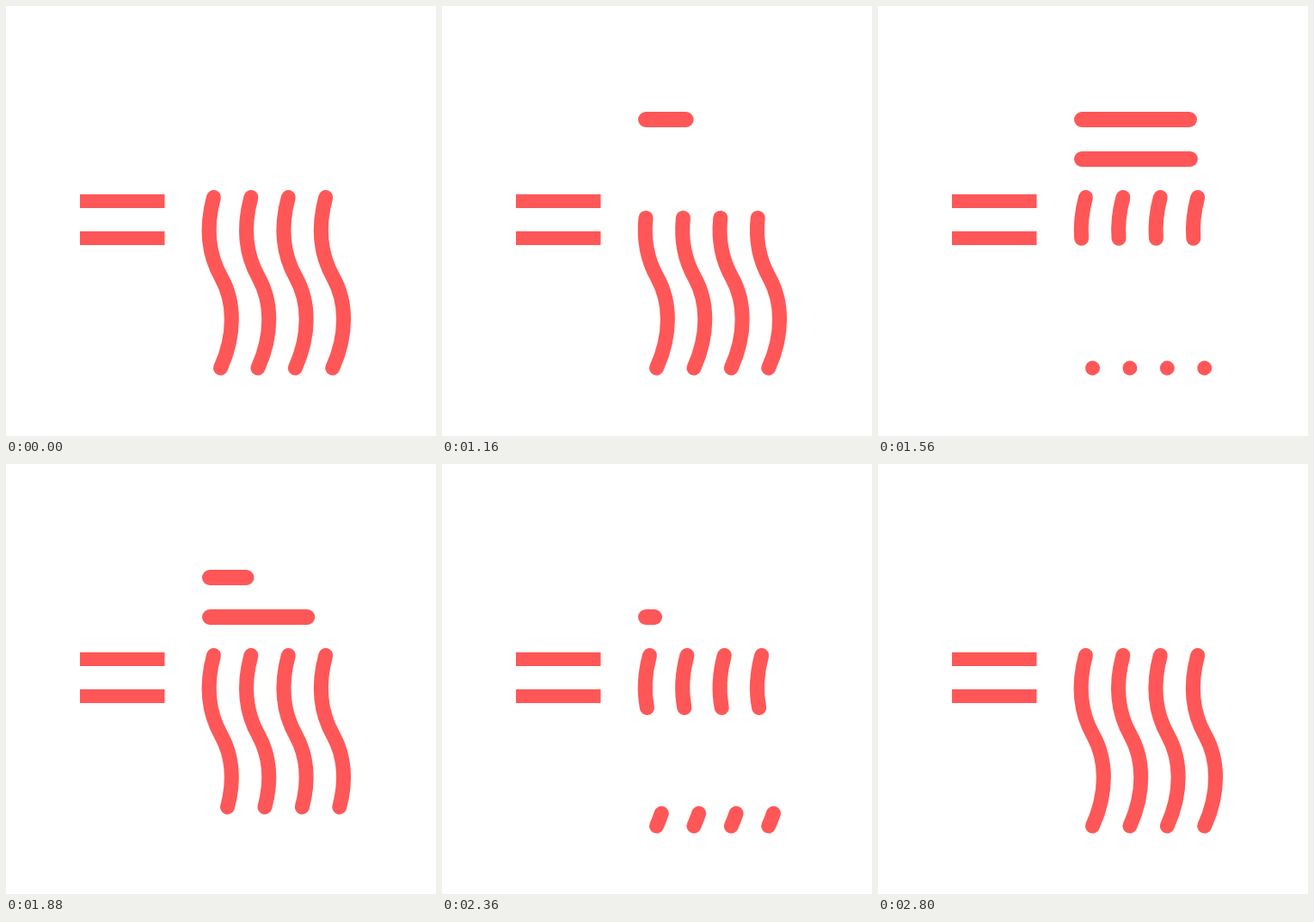
Write an HTML page with a canvas that moves like this. It is 500 px wide and 500 px high and loops after 3 s.

```html
<!DOCTYPE html>
<html lang="en">
<head>
<meta charset="utf-8">
<title>Steam</title>
<style>
html, body { margin: 0; width: 100%; height: 100%; overflow: hidden; background: #fff; }
canvas { display: block; width: 500px; height: 500px; }
</style>
</head>
<body>
<canvas id="stage" width="500" height="500"></canvas>
<script>
const ctx = document.getElementById('stage').getContext('2d');
const LOOP = 3000, STEP = 20, RED = '#ff5757';
const WAVE_COUNT = 4, WAVE_GAP = 43.4, BAR_LEN = 130;

const waveShape = 'M241.5 222.5C233 254 234 287 250.5 316C266 344 267 382 249.5 421';
const wave = new Path2D(waveShape);
const measure = document.createElementNS('http://www.w3.org/2000/svg', 'path');
measure.setAttribute('d', waveShape);
const waveLen = measure.getTotalLength();

// Blinking dots: on, off, x, y
const dots = [
  [300, 460, 116.5, 123.5],
  [480, 640, 154.5, 123.5],
  [660, 800, 116.5, 163.5],
  [820, 980, 154.5, 163.5]
];

// Progress from 0 to 1 between two times
const ramp = (t, a, b) => Math.min(1, Math.max(0, (t - a) / (b - a)));
const ease = (t, a, b) => {
  const p = ramp(t, a, b);
  return p * p * (3 - 2 * p);
};

function drawDot([on, off, x, y], t) {
  if (t < on || t >= off) return;
  ctx.beginPath();
  ctx.arc(x, y, 9.2, 0, Math.PI * 2);
  ctx.fill();
}

function drawBar(y, size) {
  if (size <= 0) return;
  ctx.lineWidth = 18;
  ctx.beginPath();
  ctx.moveTo(237, y);
  ctx.lineTo(237 + Math.max(0.01, size * BAR_LEN), y);
  ctx.stroke();
}

// Strokes the part of every wave between two fractions of its length
function drawWaves(from, to) {
  const a = Math.min(from * waveLen, waveLen - 0.1);
  const b = to >= 1 ? waveLen + 10 : to * waveLen;
  ctx.lineWidth = 17;
  ctx.setLineDash([Math.max(0.05, b - a), 2000]);
  ctx.lineDashOffset = -a;
  for (let i = 0; i < WAVE_COUNT; i++) {
    ctx.save();
    ctx.translate(i * WAVE_GAP, 0);
    ctx.stroke(wave);
    ctx.restore();
  }
  ctx.setLineDash([]);
}

// The second refill slows through the middle and speeds up at the end
function refill(t) {
  return 0.3 * ramp(t, 2110, 2360) + 0.24 * ramp(t, 2360, 2580) + 0.46 * ramp(t, 2580, 2800);
}

function steam(t) {
  if (t < 1562) drawWaves(ease(t, 1050, 1562), 1);
  if (t >= 1360 && t < 2020) drawWaves(0, ease(t, 1348, 2022));
  if (t >= 2020 && t < 2430) drawWaves(ease(t, 2020, 2430), 1);
  if (t >= 2120) drawWaves(0, refill(t));
}

function draw(t) {
  ctx.fillStyle = '#fff';
  ctx.fillRect(0, 0, 500, 500);
  ctx.fillStyle = ctx.strokeStyle = RED;
  ctx.lineCap = 'round';

  ctx.fillRect(86, 219, 98.5, 16);
  ctx.fillRect(86, 262, 98.5, 16);
  dots.forEach(d => drawDot(d, t));

  drawBar(132, ease(t, 1020, 1366) - ease(t, 1484, 2125));
  drawBar(178, ease(t, 1291, 1592) - ease(t, 1702, 2495));
  steam(t);
}

const start = performance.now();
function tick() {
  const t = (performance.now() - start) % LOOP;
  draw(Math.floor(t / STEP) * STEP);
  requestAnimationFrame(tick);
}
tick();
</script>
</body>
</html>
```
